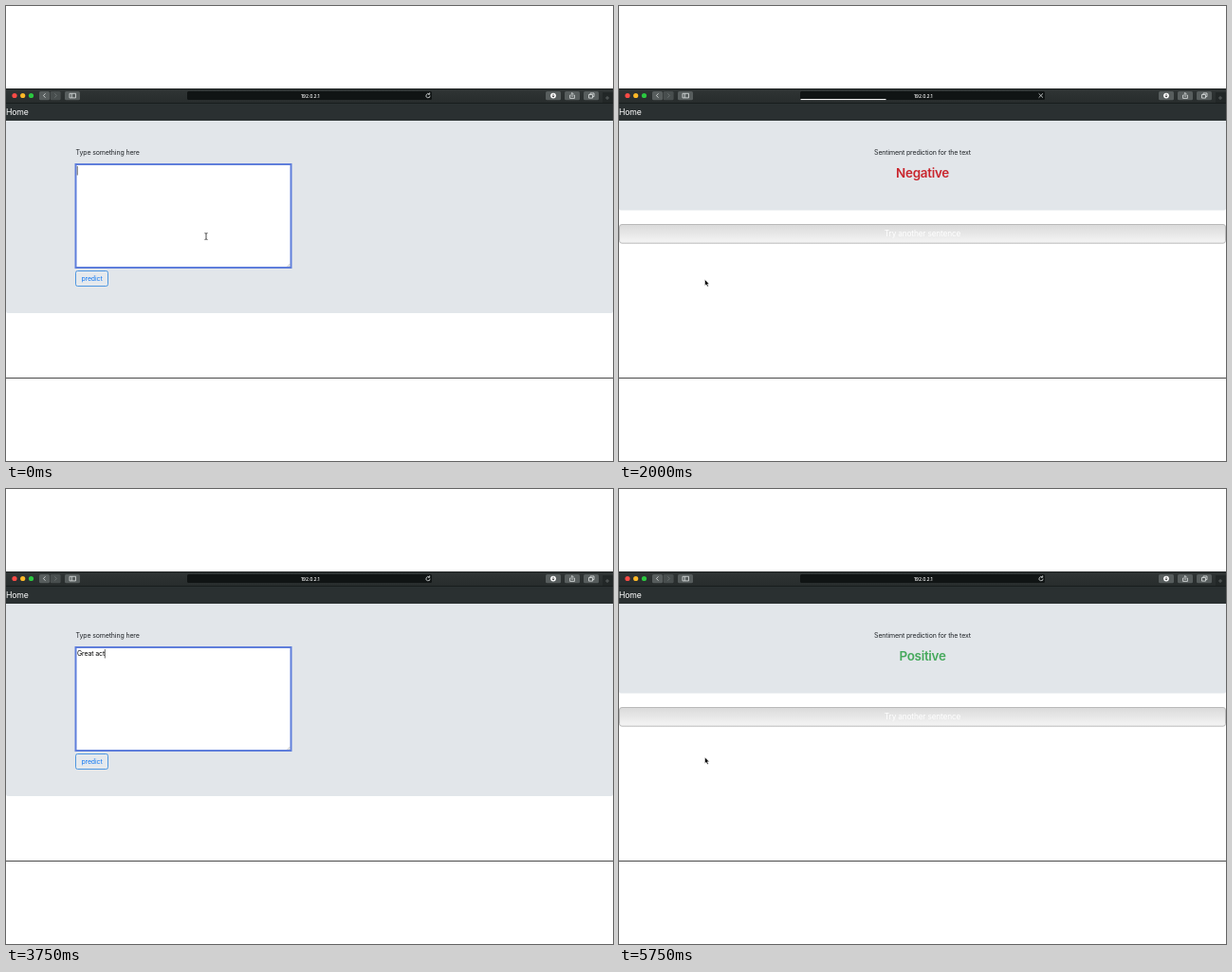
Animation of 640 by 480 pixels, one loop 6 s. Source, as an HTML page:

```html
<!DOCTYPE html>
<html lang="en">
<head>
<meta charset="utf-8">
<title>Sentiment form</title>
<style>
  html, body { margin: 0; width: 100%; height: 100%; overflow: hidden; background: #fff; }
  svg { display: block; width: 100%; height: 100%; }
  text { font: 7px Inter, "Open Sans", sans-serif; letter-spacing: -.02em; white-space: pre; fill: #212529; }
  .mid { text-anchor: middle; }
  .line { fill: none; stroke: #dfe2e2; stroke-width: .8; }
  #home { font-size: 8.7px; fill: #fff; }
  #address { font-size: 5px; font-weight: 500; fill: #fff; }
  #verdict { font-size: 13.4px; font-weight: 600; }
  #again { font-size: 8.3px; fill: #fff; }
  #typed { fill: #000; }
</style>
</head>
<body>
<svg viewBox="0 0 640 480">
  <defs>
    <linearGradient id="bar" x2="0" y2="1">
      <stop stop-color="#303535"/><stop offset="1" stop-color="#272c2c"/>
    </linearGradient>
    <linearGradient id="silver" x2="0" y2="1">
      <stop stop-color="#dadada"/><stop offset="1" stop-color="#f5f5f5"/>
    </linearGradient>
  </defs>

  <!-- browser toolbar -->
  <rect y="87" width="640" height="16" fill="url(#bar)"/>
  <rect y="87" width="640" height=".7" fill="#171b1b"/>
  <circle cx="9" cy="94.5" r="2.6" fill="#fb4b46"/>
  <circle cx="17.7" cy="94.5" r="2.6" fill="#fdb827"/>
  <circle cx="26.5" cy="94.5" r="2.6" fill="#2bc840"/>
  <g fill="#575d5d">
    <rect x="35" y="90" width="11" height="9.3" rx="1.5"/>
    <rect x="46.6" y="90" width="11" height="9.3" rx="1.5" fill="#484e4e"/>
    <rect x="62" y="90" width="16" height="9.3" rx="1.5"/>
    <rect x="569" y="90" width="16" height="9.3" rx="1.5"/>
    <rect x="589" y="90" width="16" height="9.3" rx="1.5"/>
    <rect x="609" y="90" width="16" height="9.3" rx="1.5"/>
  </g>
  <path class="line" d="M41.5 92.3l-2 2.2 2 2.2M67 92.3h6.5v4.6h-6.5zM69.3 92.3v4.6"/>
  <path class="line" style="stroke:#737979" d="M51.3 92.3l2 2.2-2 2.2"/>
  <circle cx="577" cy="94.6" r="2.9" fill="#fff"/>
  <path class="line" style="stroke:#333" d="M577 92.8v3M575.8 94.8l1.2 1.3 1.2-1.3"/>
  <path id="share" class="line" d="M595.6 94h-1v3.4h4.8v-3.4h-1M597 96v-4.2M595.7 92.8l1.3-1.3 1.3 1.3"/>
  <path class="line" d="M614.5 93.5h4v3.6h-4zM616 93.5v-1.5h4v3.6h-1.5"/>
  <rect x="629" y="91" width="11" height="12" fill="#222727"/>
  <path class="line" style="stroke:#626868" d="M634 95v4M632 97h4"/>
  <rect x="191" y="90" width="258" height="9" rx="1.5" fill="#101414"/>
  <rect id="progress" x="191.5" y="98" height="1.1" fill="#f2f2f2"/>
  <text id="address" class="mid" x="320.7" y="96.5">192.0.2.1</text>
  <path id="reload" class="line" d="M446.3 93a2.1 2.1 0 1 0 .8 1.7M444.8 93.2h1.9v-1.9"/>
  <path id="stop" class="line" d="M442.6 92.3l4.4 4.4M447 92.3l-4.4 4.4"/>

  <!-- page header -->
  <rect y="102.5" width="640" height="18.5" fill="#2a3031"/>
  <rect y="102" width="640" height=".8" fill="#151919"/>
  <text id="home" x="0" y="115">Home</text>

  <g id="form">
    <path d="M0 121H640V322a2 2 0 0 1-2 2H2a2 2 0 0 1-2-2z" fill="#e2e6ea"/>
    <text x="73.5" y="157">Type something here</text>
    <rect id="box" x="73.5" y="167" width="227" height="109" fill="#fff"/>
    <path d="M296.5 275l3-3M298.3 275l1.2-1.2" stroke="#999" stroke-width=".6"/>
    <text id="typed" x="75" y="176"></text>
    <rect id="caret" y="169" width=".8" height="9.5" fill="#444"/>
    <rect id="button" x="73.5" y="279.5" width="34" height="16" rx="2"/>
    <text id="predict" class="mid" x="90.5" y="290">predict</text>
  </g>

  <g id="result">
    <path d="M0 121H640V213.500a2 2 0 0 1-2 2H2a2 2 0 0 1-2-2z" fill="#e2e6ea"/>
    <text class="mid" x="320" y="157">Sentiment prediction for the text</text>
    <text id="verdict" class="mid" x="320" y="180.700"></text>
    <rect x=".5" y="230.500" width="639" height="19.700" rx="2.500" fill="url(#silver)" stroke="#b4b4b4" stroke-width=".9"/>
    <text id="again" class="mid" x="320" y="243.300">Try another sentence</text>
  </g>

  <rect y="392" width="640" height="1" fill="#4a4a4a"/>

  <g id="beam"><path d="M-1.500-3.500q1.500 0 1.500 1v5q0 1-1.500 1M1.500-3.500q-1.500 0-1.500 1M0 2.500q0 1 1.500 1" fill="none" stroke="#222" stroke-width=".8"/></g>
  <g id="arrow"><path d="M0 0v6.500l1.500-1.300 1.100 2.400 1.200-.5-1.100-2.400h2z" fill="#000" stroke="#fff" stroke-width=".5"/></g>
  <g id="hand"><path d="M-1.500-3.500q.8-.8 1.300.2l.5 1.800 2.300.5q1 .4.700 1.700l-.6 2.800h-3.500l-2-2.600q-.1-1 1.100-.5z" fill="#fff" stroke="#222" stroke-width=".7"/></g>
</svg>

<script>
const $ = id => document.getElementById(id);
const STEP = 250, LOOP = 6000;
const CHARS_PER_STEP = 4.25;

const show = (id, on) => $(id).style.display = on ? "" : "none";
const set = (id, attrs) => {
  for (const key in attrs) $(id).setAttribute(key, attrs[key]);
};

// Each entry holds from its time until the next one: [ms, cursor, x, y]
const pointer = [
  [0, "beam", 211, 243],
  [250, ""],
  [1500, "hand", 91, 288],
  [1750, "arrow", 90.5, 288.5],
  [2250, "hand", 178.5, 250],
  [2500, "arrow", 180.5, 245],
  [2750, "beam", 181, 243],
  [3250, ""],
  [5000, "beam", 150, 262],
  [5250, "hand", 91, 288],
  [5750, "arrow", 90.5, 283]
];
// Loading bar width by start time
const loading = { 1750: 18.5, 2000: 90, 2500: 127.5, 5500: 0 };

function draw(now) {
  const t = Math.floor(now % LOOP / STEP) * STEP;
  const within = (from, to) => t >= from && t < to;
  const result = within(2000, 2500) || t >= 5750;
  const second = t >= 2500;
  const focused = t < 1750 || within(2750, 5500);
  const pressed = within(1500, 2000) || within(5250, 5750);

  show("form", !result);
  show("result", result);
  $("verdict").textContent = second ? "Positive" : "Negative";
  $("verdict").style.fill = second ? "#46a95c" : "#c9252d";

  const sentence = second ? "Great acting, great movie!" : "What a dreadful movie";
  const count = Math.round((t - (second ? 3200 : 0)) / STEP * CHARS_PER_STEP);
  $("typed").textContent = sentence.slice(0, Math.max(0, count));
  show("caret", focused);
  if (!result) set("caret", { x: 74.8 + (count > 0 ? $("typed").getComputedTextLength() : 0) });

  set("box", { stroke: focused ? "#5f7edb" : "#8b8e91", "stroke-width": focused ? 2 : .9 });
  set("button", { fill: pressed ? "#0a66fa" : "#e5e9ed", stroke: pressed ? "#0a66fa" : "#3f8fdf", "stroke-width": .9 });
  $("predict").style.fill = pressed ? "#fff" : "#147af3";

  const busy = t in loading;
  show("stop", busy);
  show("reload", !busy);
  set("progress", { width: loading[t] || 0 });
  set("share", { opacity: t === 1750 ? .25 : 1 });

  const [, cursor, x, y] = pointer.findLast(p => p[0] <= t);
  for (const id of ["beam", "arrow", "hand"]) show(id, id === cursor);
  if (cursor) set(cursor, { transform: `translate(${x} ${y})` });

  requestAnimationFrame(() => draw(performance.now()));
}
draw(0);
</script>
</body>
</html>
```
